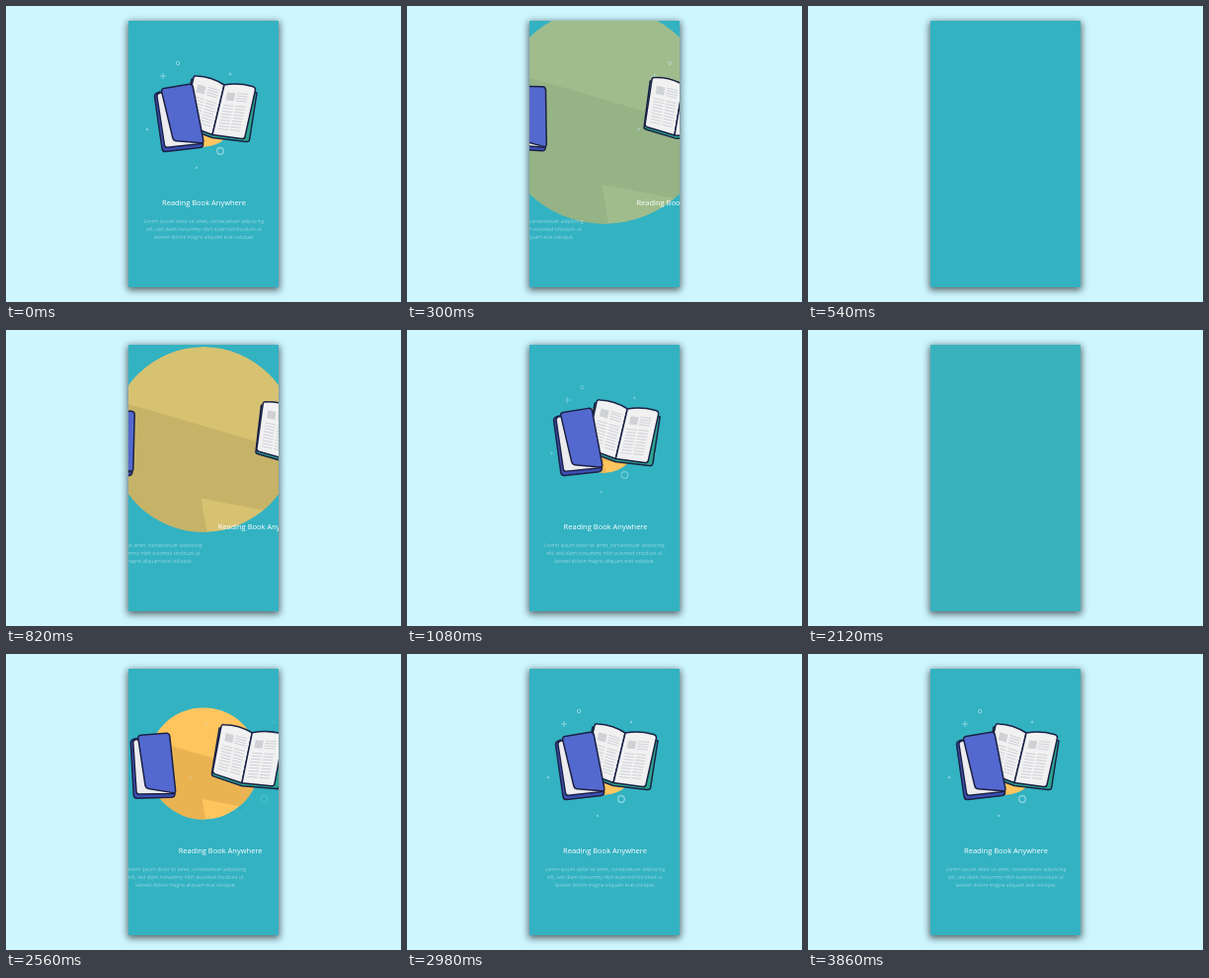
Animation, 400 px wide and 300 px high, one loop 3.9 s. Source, as an HTML page:

```html
<!DOCTYPE html>
<html lang="en">
<head>
<meta charset="utf-8">
<title>Reading Book Anywhere</title>
<style>
html, body { margin: 0; width: 100%; height: 100%; overflow: hidden; background: #cdf6ff; }
.card {
  position: absolute; left: 124px; top: 15px; width: 152px; height: 270px;
  overflow: hidden; background: #33b2c2;
  box-shadow: 0 2px 7px 1px rgba(0, 0, 0, .6);
}
svg { display: block; width: 152px; height: 270px; }
text { font-family: "Open Sans", "Noto Sans", sans-serif; text-anchor: middle; fill: #fff; }
.title { font-size: 7.5px; font-weight: 500; }
.para { font-size: 5.2px; font-weight: 300; opacity: .7; }
.ink { stroke: #1b2145; stroke-width: 1.5; stroke-linejoin: round; }
</style>
</head>
<body>
<div class="card">
<svg viewBox="124 15 152 270">
  <defs>
    <clipPath id="disc"><circle r="32"/></clipPath>
    <g id="print" fill="none" stroke="#cfd1d5" stroke-width="1">
      <path d="M15 7h11M15 9.5h11M15 12h11M15 14.5h11"/>
      <path d="M4 20h10M4 23h10M4 26h10M4 29h10M4 32h10M4 35h10M4 38h10M4 41h10M4 44h10"/>
      <path d="M16 20h10M16 23h10M16 26h10M16 29h10M16 32h10M16 35h10M16 38h10M16 41h10M16 44h10"/>
      <path d="M5 7h8v8h-8z" fill="#cfd1d5" stroke="none"/>
    </g>
  </defs>

  <g id="sun" clip-path="url(#disc)">
    <circle r="32" fill="#fec55f"/>
    <path d="M-32 -14L-18 -10L16 0L34 6V27L-.8 20.3L1.5 34H-34Z" fill="#e9b352"/>
  </g>

  <g id="decor" fill="none" stroke="#c4eef2" stroke-opacity=".65" stroke-width=".9">
    <path d="M156 71h6M159 68v6M225.7 69h2.6M227 67.7v2.6M141.7 125h2.6M143 123.7v2.6M192 164h2M193 163v2M246.8 125h2.4M248 123.8v2.4"/>
    <circle cx="174" cy="58" r="1.7"/>
    <circle cx="217" cy="147" r="3.3" stroke-width="1.2"/>
  </g>

  <g id="right">
    <path class="ink" fill="#2aa78f" d="M188 74L179 119Q178 122 181 123L209 133.5L243 137.5Q246 138 246.6 135.500L254 88Z"/>
    <path class="ink" fill="#f1f1f2" d="M193.500 71Q190.500 70 189.800 73L180 117Q179.500 119.500 182 120.500L209 130.500L221 80Q208 71.500 193.500 71Z"/>
    <path class="ink" fill="#f1f1f2" d="M221 80Q235 77.500 249.500 81.500Q253 82.500 252.400 85.500L242 132.500Q241.500 135 238.500 134.500L209 130.500Z"/>
    <use href="#print" transform="matrix(1 .3 -.22 .98 191 71)"/>
    <use href="#print" transform="matrix(1 .1 -.23 1 221 80)"/>
  </g>

  <g id="left">
    <path class="ink" fill="#3d50b4" d="M156 87Q150 88.500 150.500 92L158 144.500Q158.600 148 162 147.500L196.500 143.500Q200 143 199.500 139Z"/>
    <path class="ink" stroke-width="1" fill="#ececef" d="M156 88Q152.500 89 153 92L160.500 141Q161 143.500 163.500 143.200L198 139.500L188 86Z"/>
    <path class="ink" fill="#5469cf" d="M160 83.500L185.500 79.300Q188.600 79 189.300 82L199.800 136Q200.300 139 197.300 138.800L172.500 136.800Q169.500 136.500 168.800 133.500L157.700 87Q157 84 160 83.500Z"/>
  </g>

  <text id="title" class="title" x="200.500" y="201.500">Reading Book Anywhere</text>
  <g id="para" class="para">
    <text x="200.500" y="219.700">Lorem ipsum dolor sit amet, consectetuer adipiscing</text>
    <text x="200.500" y="227.700">elit, sed diam nonummy nibh euismod tincidunt ut</text>
    <text x="200.500" y="235.700">laoreet dolore magna aliquam erat volutpat.</text>
  </g>
</svg>
</div>
<script>
const LOOP = 3900;
const el = id => document.getElementById(id);
const [sun, decor, left, right, title, para] =
  ['sun', 'decor', 'left', 'right', 'title', 'para'].map(el);

// Spread of each group: 0 at rest, 1 fully off the card.
function leave(p, fade) {
  return {
    disc: p ** 1.2, books: p ** 1.9, text: p ** 1.65,
    sunAlpha: 1 - fade * p ** 1.3, decorAlpha: 1 - p ** 3
  };
}

function enter(p) {
  const q = 1 - p;
  return {
    disc: q ** 3, books: q ** 3, text: q ** 4,
    sunAlpha: Math.min(1, p * 3), decorAlpha: p ** 1.5
  };
}

function poseAt(t) {
  const part = (start, end) => Math.min(1, Math.max(0, (t - start) / (end - start)));
  if (t < 680) return leave(part(10, 540), 1);
  if (t < 1760) return enter(part(680, 1200));
  if (t < 2320) return leave(part(1760, 2120), .965);
  return enter(part(2320, 2840));
}

function place(node, dx, turn = '') {
  node.setAttribute('transform', `translate(${dx} 0) ${turn}`);
}

function draw(t) {
  const s = poseAt(t);
  sun.setAttribute('transform', `translate(200 111) scale(${1 + 5 * s.disc})`);
  sun.setAttribute('opacity', s.sunAlpha);
  place(decor, 287 * s.books);
  decor.setAttribute('opacity', s.decorAlpha);
  place(left, -169 * s.books, `rotate(${32 * s.books} 175 113)`);
  place(right, 188 * s.books, `rotate(${-12 * s.books} 216 104)`);
  place(title, 200 * s.text);
  place(para, -222 * s.text);
}

const start = performance.now();
function tick() {
  draw((performance.now() - start) % LOOP);
  requestAnimationFrame(tick);
}
tick();
</script>
</body>
</html>
```
